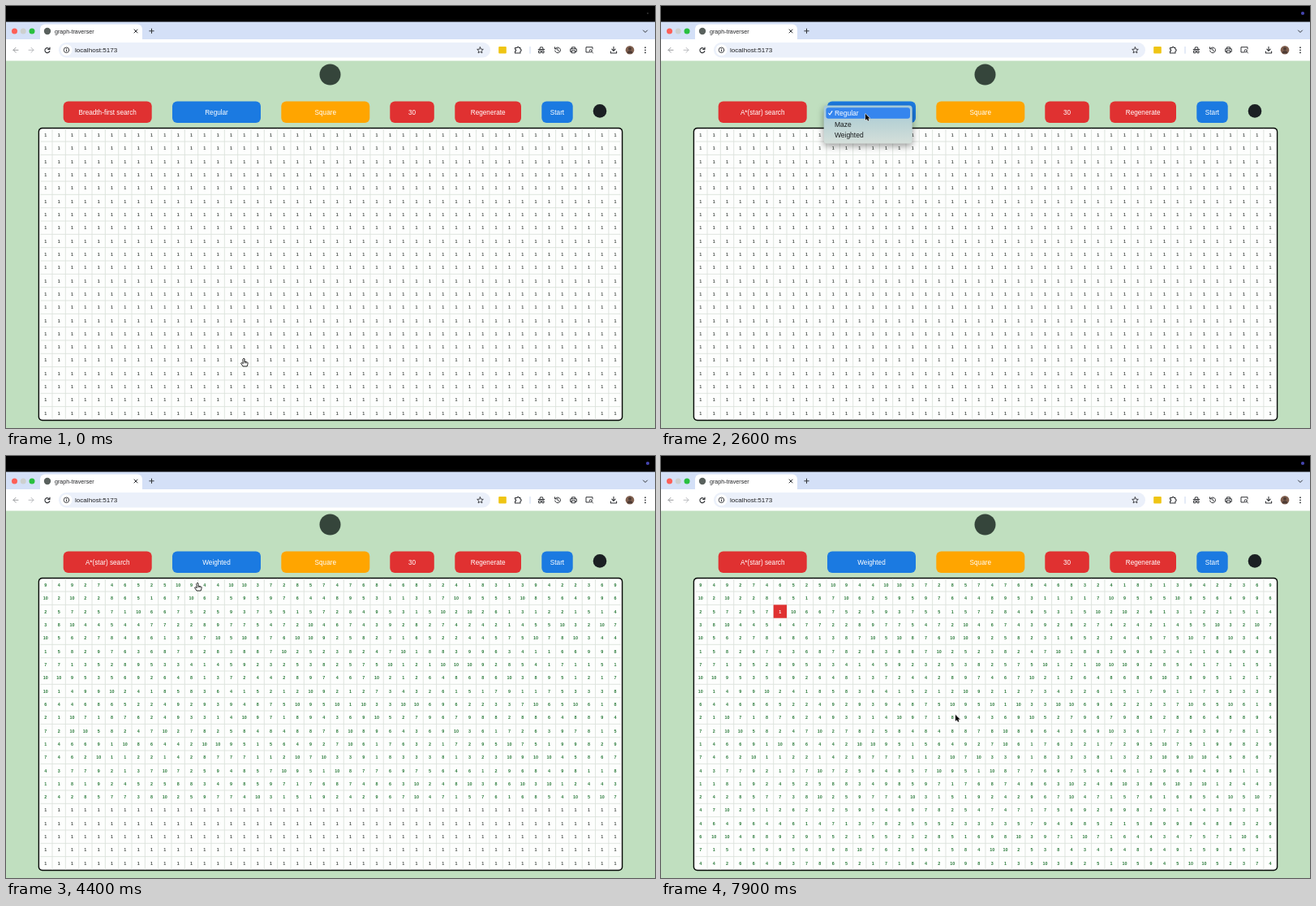
Recreate the animation shown at these times as an HTML page with a canvas. Size 800 by 520 pixels, loop 8000 ms.

```html
<!DOCTYPE html>
<html lang="en">
<head>
<meta charset="utf-8">
<title>graph-traverser</title>
<style>
  html, body { margin: 0; width: 100%; height: 100%; overflow: hidden; }
  canvas { display: block; width: 800px; height: 520px; }
</style>
</head>
<body>
<canvas width="800" height="520"></canvas>
<script>
const ctx = document.querySelector('canvas').getContext('2d');
const LOOP = 8000, STEP = 100;
const COLS = 44, ROWS = 22, CELL = 16.33, LEFT = 40.7, TOP = 150.7;
const RED = '#e03131', BLUE = '#1b7ae1', ORANGE = '#ffa500', INK = '#303236';
const SANS = '"Liberation Sans", Arial, sans-serif';

const searches = ['Breadth-first search', 'Depth-first search',
  'Uniform-cost search(Max-Heap)', 'Uniform-cost search(Min-Heap)', 'A*(star) search'];
const layouts = ['Regular', 'Maze', 'Weighted'];

// time, x, y of the pointer tip
const path = [
  [0, 293, 434], [200, 293, 434], [800, 125, 131], [1100, 125, 131],
  [1600, 125, 185], [1700, 125, 185], [2300, 252, 132], [2600, 252, 133],
  [3200, 243, 144], [3500, 237, 158], [4400, 236, 156], [4700, 236, 156],
  [5600, 192, 203], [6300, 161, 209], [6800, 147, 191], [7100, 147, 191],
  [7900, 363, 319]
];

let seed = 58311;
function random() {
  seed = (seed * 1664525 + 1013904223) % 4294967296;
  return seed / 4294967296;
}
const weights = Array.from({ length: COLS * ROWS }, () => 1 + Math.floor(random() * 10));

function pointerAt(t) {
  const i = path.findIndex(p => p[0] > t);
  if (i < 0) return path[path.length - 1].slice(1);
  const [t0, x0, y0] = path[i - 1], [t1, x1, y1] = path[i];
  const u = (t - t0) / (t1 - t0), k = u * u * (3 - 2 * u);
  return [x0 + (x1 - x0) * k, y0 + (y1 - y0) * k];
}

function box(x, y, w, h, fill, r = 0) {
  ctx.fillStyle = fill;
  ctx.beginPath();
  ctx.roundRect(x, y, w, h, r);
  ctx.fill();
}

function dot(x, y, r, fill) {
  ctx.fillStyle = fill;
  ctx.beginPath();
  ctx.arc(x, y, r, 0, 7);
  ctx.fill();
}

function text(s, x, y, size, color, align = 'left', weight = 400) {
  ctx.font = `${weight} ${size}px ${SANS}`;
  ctx.textAlign = align;
  ctx.textBaseline = 'alphabetic';
  ctx.fillStyle = color;
  ctx.fillText(s, x, y + size * 0.355);
}

function shape(d, x, y, stroke, width = 1, fill) {
  const p = new Path2D(d);
  ctx.save();
  ctx.translate(x, y);
  ctx.lineCap = ctx.lineJoin = 'round';
  if (fill) { ctx.fillStyle = fill; ctx.fill(p); }
  ctx.strokeStyle = stroke;
  ctx.lineWidth = width;
  ctx.stroke(p);
  ctx.restore();
}

function drawBrowser(t) {
  box(0, 0, 800, 520, '#c0dfbf');
  box(0, 0, 800, 20, '#000');
  dot(791, 9, t ? 2.1 : 0.8, t ? '#4545b0' : '#555');
  box(0, 19.5, 800, 22, '#d4e0f7');
  box(0, 41, 800, 26.5, '#fff');
  box(42, 22.5, 126, 19, '#fff', [6, 6, 0, 0]);
  dot(10.5, 31, 3.5, '#fe5f57');
  dot(21.2, 31, 3.5, '#cdd0cf');
  dot(32, 31, 3.5, '#28c03f');
  dot(51, 31, 4.2, '#59615d');
  text('graph-traverser', 60, 31, 7.1, '#1f2023');
  shape('M-2-2 2 2M2-2-2 2', 160, 31, INK);
  shape('M-2.7 0H2.7M0-2.7V2.7', 179.5, 30.8, INK);
  shape('M-2.5-1 0 1.5 2.5-1', 788, 31, INK);

  box(65, 45, 532, 18.5, '#ebf0fa', 9.2);
  dot(74.5, 54.2, 7, '#fff');
  text('localhost:5173', 85, 54.3, 8.1, '#202124');
  shape('M3 0H-3M0-3-3 0 0 3', 12, 54.3, '#9a9c9f');
  shape('M-3 0H3M0-3 3 0 0 3', 31, 54.3, '#b9bbbe');
  shape('M2.6-1.2A3 3 0 1 0 2.8 1M3-3.4V-1H.6', 51, 54.5, INK, 1.1);
  shape('M3.3 0A3.3 3.3 0 1 1-3.3 0 3.3 3.3 0 1 1 3.3 0M0-.3V1.6M0-1.7V-1.6', 74.5, 54.3, INK, 0.9);
  shape('M0-3.8 1.1-1.3 3.8-1.1 1.8.7 2.4 3.4 0 2-2.4 3.4-1.8.7-3.8-1.1-1.1-1.3Z', 584.5, 54.5, INK, 0.9);

  box(607.2, 50, 9.6, 8.6, '#efc514', 1);
  shape('M-3.5-2.5H-1A1.2 1.2 0 0 1 1.4-2.5H3V-.7A1.2 1.2 0 0 1 3 1.7V4H-3.5V1.7A1.2 1.2 0 0 0-3.5-.7Z', 631, 54, INK, 1.1);
  shape('M0-4V4', 646, 54.3, '#cbd7ef');
  shape('M-2.2-.8-1.5-3.5H1.5L2.2-.8M-3.8-.8H3.8M-3 .8H3V3.5H1V2.3H-1V3.5H-3Z', 660, 54.3, INK);
  shape('M-2.8-1.8A3.4 3.4 0 1 1-3.3.8M-3.5-3.6V-1.4H-1.3M0-1.8V.2L1.6 1.2', 680, 54.3, INK);
  shape('M-2-1.5V-3.5H2V-1.5M-2 2H-3.8V-1.5H3.8V2H2M-2 .7H2V3.5H-2Z', 699.5, 54.3, INK);
  shape('M0 3H-4V-3.3H4V-1M4.5 4 3 2.5M3.3 1.3A1.6 1.6 0 1 1 .1 1.3 1.6 1.6 0 1 1 3.3 1.3', 719, 54, INK);
  shape('M0-4V1M-2.2-1.1 0 1.1 2.2-1.1M-3.6 1.8V3.7H3.6V1.8', 749, 54.3, INK, 1.1);
  dot(769, 54.3, 5.3, '#80604f');
  dot(769, 52.8, 2, '#4d3b35');
  box(765.8, 55.2, 6.4, 3.2, '#4d3b35', [3, 3, 1, 1]);
  for (const y of [51.2, 54.3, 57.4]) dot(788, y, 0.9, INK);
}

function button(label, x, w, fill) {
  box(x, 117.5, w, 26.5, fill, 6);
  text(label, x + w / 2, 131, 8.2, '#fff', 'center');
}

function drawControls(t) {
  dot(399.5, 84.5, 13, '#35453b');
  button(searches[t < 1800 ? 0 : 4], 70.7, 109, RED);
  button(layouts[t < 3600 ? 0 : 2], 205, 109, BLUE);
  button('Square', 339.3, 109, ORANGE);
  button('30', 473.3, 54.5, RED);
  button('Regenerate', 553.3, 81.7, RED);
  button('Start', 660.3, 38.4, BLUE);
  dot(732, 129.4, 8.3, '#1b2023');
}

function drawGrid(t) {
  box(39.7, 149.8, 720.6, 361.4, '#050806', 5);
  box(41.1, 151.2, 717.8, 358.6, '#fdfefd', 4);
  ctx.strokeStyle = '#dce2dc';
  ctx.lineWidth = 0.9;
  ctx.beginPath();
  for (let c = 1; c < COLS; c++) {
    const x = LEFT + c * CELL;
    ctx.moveTo(x, 151.2);
    ctx.lineTo(x, 509.8);
  }
  for (let r = 1; r < ROWS; r++) {
    const y = TOP + r * CELL;
    ctx.moveTo(41.1, y);
    ctx.lineTo(758.9, y);
  }
  ctx.stroke();

  const weightedRows = Math.floor((t - 3550) / 50);
  for (let r = 0; r < ROWS; r++) {
    const weighted = r < weightedRows;
    for (let c = 0; c < COLS; c++) {
      const x = LEFT + c * CELL, y = TOP + r * CELL;
      const start = t >= 6900 && r === 2 && c === 6;
      if (start) box(x, y, CELL, CELL, RED);
      text(weighted ? weights[r * COLS + c] : 1, x + CELL / 2, y + CELL / 2 + 0.1, 5.4,
        start ? '#fff' : weighted ? '#2b7b3b' : '#4a514c', 'center', 700);
    }
  }
}

function drawMenu(items, x, w, tints, pointerY) {
  const h = items.length * 13.65 + 6;
  const fill = ctx.createLinearGradient(0, 122.5, 0, 122.5 + h);
  tints.forEach((c, i) => fill.addColorStop(i / (tints.length - 1), c));
  ctx.save();
  ctx.shadowColor = '#0006';
  ctx.shadowBlur = 9;
  ctx.shadowOffsetY = 3;
  box(x, 122.5, w, h, fill, 4);
  ctx.restore();
  const hover = Math.floor((pointerY - 125.2) / 13.65);
  items.forEach((item, i) => {
    const y = 132 + i * 13.65, color = i === hover ? '#fff' : '#171a1c';
    if (i === hover) box(x + 2.7, y - 6.8, w - 5.4, 13.6, '#3585ee', 3);
    if (!i) shape('M-2 .2-.7 2 2.2-2.4', x + 8, y, color, 1.1);
    text(item, x + 13.2, y + 0.1, 8.5, color);
  });
}

function drawPointer(x, y, hand) {
  if (hand) {
    shape('M-1 1Q0-.8 1 1V4.2L4.6 5Q5.4 5.4 5 7.2L4.2 10H-1L-3.5 6.2Q-3 4.8-1 6.3Z',
      x, y, '#111', 0.9, '#fff');
    shape('M1.2 4.4V6M3 4.8V6.2', x, y, '#111', 0.7);
  } else {
    shape('M0 0V7.6L1.8 6 3 8.6 4.3 8 3.1 5.5H5.5Z', x, y, '#fff', 1.2, '#000');
    shape('M0 0V7.6L1.8 6 3 8.6 4.3 8 3.1 5.5H5.5Z', x, y, '#000', 0.2, '#000');
  }
}

function draw(t) {
  const [x, y] = pointerAt(t);
  const searchOpen = t >= 1000 && t < 1800;
  const layoutOpen = t >= 2400 && t < 3600;
  drawBrowser(t);
  drawControls(t);
  drawGrid(t);
  if (searchOpen) drawMenu(searches, 66.5, 143.5, ['#e9b9ae', '#e1c9c0', '#d5d9d3', '#d9ddd9', '#dfe2df'], y);
  if (layoutOpen) drawMenu(layouts, 200.7, 109, ['#a3c8d8', '#bbd3d5', '#d5dfda'], y);
  drawPointer(x, y, !searchOpen && !layoutOpen && t < 4700);
}

const began = performance.now();
function tick() {
  const t = (performance.now() - began) % LOOP;
  draw(Math.floor(t / STEP) * STEP);
  requestAnimationFrame(tick);
}
tick();
</script>
</body>
</html>
```
